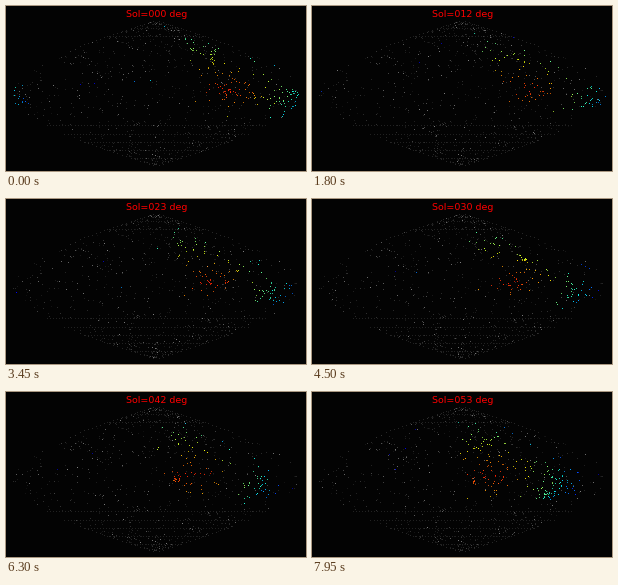
Animation, 300 px wide and 165 px high, one loop 8 s. Source, as a matplotlib script:

```python
import numpy as np
import matplotlib.pyplot as plt
from matplotlib.animation import FuncAnimation

W, H, DPI = 300, 165, 100
CX, CY, RX, RY = 150, 87, 144, 73
STEPS_PER_DEGREE = 3
INTERVAL = 50
FRAMES = 160

# Diffuse radiants: sun-relative longitude, latitude, their spreads, count
SOURCES = dict(
    antihelion=(94, 5, 18, 11, 38),
    toroidal=(92, 46, 24, 11, 26),
    apex=(171, -7, 14, 10, 42),
    scattered=(130, 24, 32, 20, 22),
    western=(-60, 30, 32, 15, 3),
)
# Short showers: peak degree, duration, longitude, latitude, spread, count
SHOWERS = dict(
    spring=(31, 1.5, 122, 33, 2, 16),
    ecliptic=(46, 6, 67, -1, 2, 16),
    southern=(51, 4, 166, -18, 3.5, 18),
)


def project(lon, lat):
    lon = (np.asarray(lon) + 180) % 360 - 180
    lat = np.clip(lat, -89, 89)
    x = CX + RX * lon / 180 * np.cos(np.radians(lat))
    y = CY - RY * lat / 90
    return np.rint(x).astype(int), np.rint(y).astype(int)


def plot(sky, lon, lat, colors):
    x, y = project(lon, lat)
    sky[y, x] = np.maximum(sky[y, x], colors)


def scatter(sky, rng, count, low, high):
    """Gray points, uniform in both angles and so denser at the poles."""
    lat = rng.uniform(-88, 88, count)
    lon = rng.uniform(-180, 180, count)
    plot(sky, lon, lat, rng.uniform(low, high, (count, 1)))


def make_background():
    rng = np.random.default_rng(12)
    sky = np.full((H, W, 3), 0.012)

    cap = np.linspace(58, 89, 18)
    for side in (-179.9, 179.9):
        for pole in (-1, 1):
            plot(sky, np.full(cap.size, side), pole * cap, 0.15)

    for lat in (80, 70, -40, -50, -60, -70, -80):
        lon = np.linspace(-178, 178, int(90 * np.cos(np.radians(lat))) + 4)
        plot(sky, lon, np.full(lon.size, lat), 0.13)

    scatter(sky, rng, 620, 0.06, 0.2)
    scatter(sky, rng, 80, 0.22, 0.45)
    return sky


def speed_colors(lon, lat):
    """Slow red around the antihelion, through yellow and green to fast blue."""
    distance = np.hypot(np.maximum(0, np.abs(lon - 85) - 18), lat - 5)
    return plt.cm.jet(np.clip(0.88 - 0.007 * distance, 0.06, 0.88))[:, :3]


def cluster(sky, rng, degree, lon, lat, spread_lon, spread_lat, count):
    lons = rng.normal(lon, spread_lon, count)
    lats = rng.normal(lat, spread_lat, count)
    colors = speed_colors(lons + rng.normal(0, 5, count), lats)
    plot(sky, lons - degree, lats, colors * rng.uniform(0.7, 1, (count, 1)))


def draw_sky(degree):
    rng = np.random.default_rng(500 + degree)
    sky = background.copy()
    scatter(sky, rng, 60, 0.2, 0.5)

    activity = 1 + 0.35 * np.cos(2 * np.pi * degree / 18)
    for *shape, count in SOURCES.values():
        cluster(sky, rng, degree, *shape, round(count * activity))

    for peak, duration, lon, lat, spread, most in SHOWERS.values():
        strength = np.exp(-0.5 * ((degree - peak) / duration) ** 2)
        cluster(sky, rng, degree, lon, lat, spread, spread,
                round(most * strength))
    return sky


background = make_background()
fig = plt.figure(figsize=(W / DPI, H / DPI), dpi=DPI, facecolor="black")
ax = fig.add_axes([0, 0, 1, 1])
ax.axis("off")
image = ax.imshow(background, interpolation="nearest", aspect="auto",
                  extent=(0, W, H, 0), vmin=0, vmax=1)
title = ax.text(150.5, 11, "", color="red", family="DejaVu Sans",
                size=9.5 * 72 / DPI, ha="center", va="baseline")


def update(frame):
    degree = frame // STEPS_PER_DEGREE
    image.set_data(draw_sky(degree))
    title.set_text(f"Sol={degree:03d} deg")
    return image, title


anim = FuncAnimation(fig, update, frames=FRAMES, interval=INTERVAL,
                     repeat=True, repeat_delay=0)
plt.show()
```
